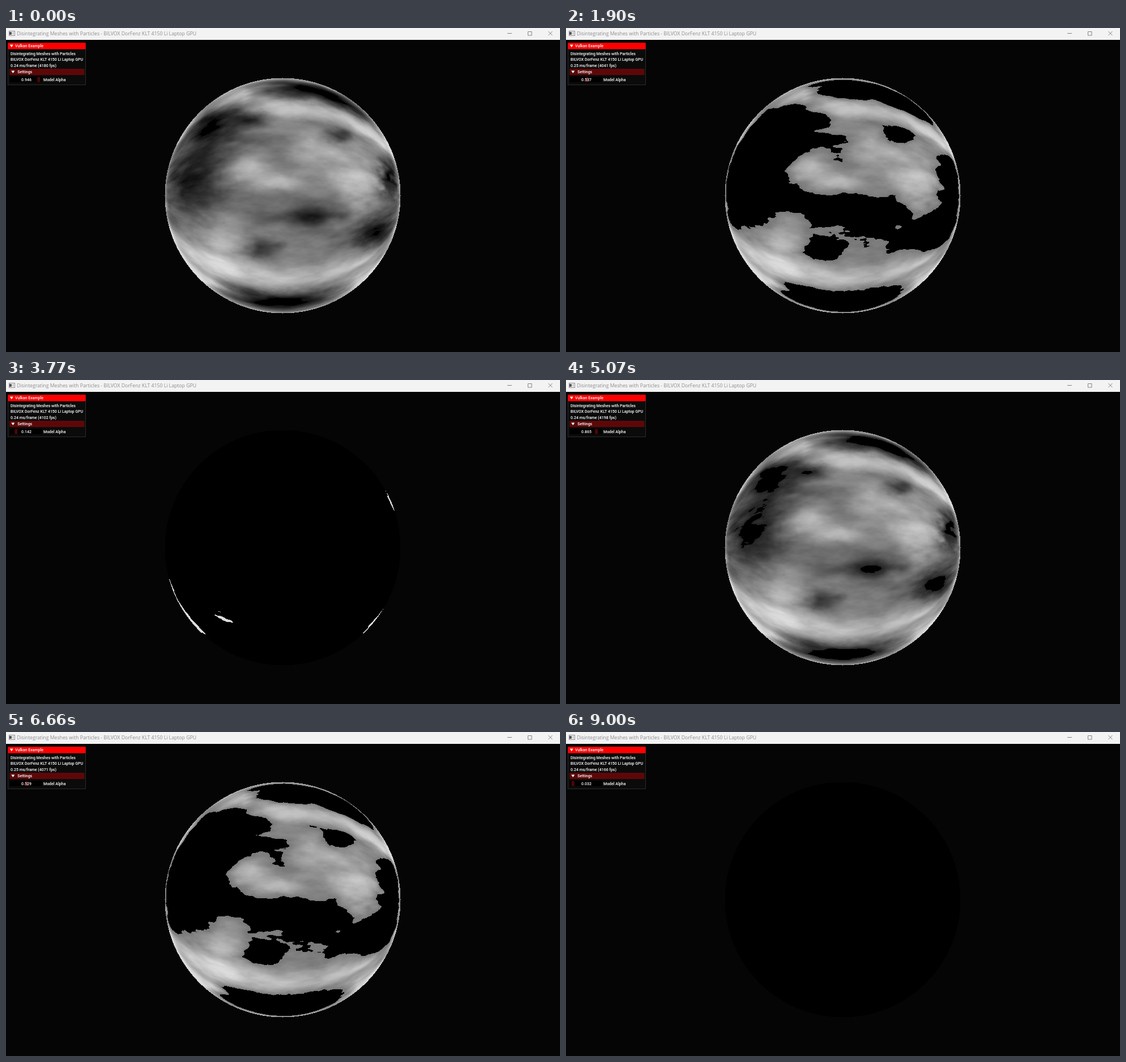
Animation, 978 px wide and 573 px high, one loop 9.07 s. Source, as an HTML page with a canvas:

```html
<!DOCTYPE html>
<html lang="en">
<head>
<meta charset="utf-8">
<title>Disintegrating Meshes with Particles</title>
<style>
  html, body { margin: 0; width: 100%; height: 100%; overflow: hidden; background: #050505; }
  canvas, svg { position: absolute; left: 0; top: 0; }
  .ui { font: 500 7px Roboto, sans-serif; fill: #fff; }
  .title { font: 8.7px "Open Sans", sans-serif; fill: #8c8c8c; }
</style>
</head>
<body>
<canvas id="stage" width="978" height="573"></canvas>
<svg width="978" height="573" viewBox="0 0 978 573">
  <rect width="978" height="21" fill="#f3f3f3"/>
  <rect x="5.5" y="5.5" width="10" height="8" fill="#fff" stroke="#8a8a8a"/>
  <rect x="6" y="7" width="4" height="5" fill="#555"/>
  <rect x="11" y="7" width="3" height="5" fill="#c8c8c8"/>
  <text class="title" x="19" y="12.8">Disintegrating Meshes with Particles - BILVOX DorFenz KLT 4150 Li Laptop GPU</text>
  <path d="M885 9.5h8M921.5 6.5h6.5v6.5h-6.5zM957.5 6l7 7m0-7l-7 7" fill="none" stroke="#777" stroke-width=".9"/>

  <rect x="3.5" y="26.5" width="137" height="74" fill="#0b0b0b" stroke="#363636" stroke-width=".8"/>
  <rect x="3.5" y="26" width="137" height="11.5" fill="#f00"/>
  <rect x="6" y="72" width="132.5" height="11.2" fill="#5d0808"/>
  <path d="M6.8 29.5h6l-3 4.7zM9.3 75.4h6l-3 4.7z" fill="#fff"/>
  <rect x="7" y="86" width="57" height="10" fill="#000"/>
  <rect id="grab" y="87" width="4.8" height="8.5" fill="#550404"/>
  <g class="ui">
    <text x="16" y="34.4">Vulkan Example</text>
    <text x="8" y="48.2">Disintegrating Meshes with Particles</text>
    <text x="8" y="58.4">BILVOX DorFenz KLT 4150 Li Laptop GPU</text>
    <text id="rate" x="8" y="68.5"></text>
    <text x="20.3" y="80.3">Settings</text>
    <text id="value" x="36" y="93.5" text-anchor="middle"></text>
    <text x="66" y="93.5">Model Alpha</text>
  </g>
</svg>
<script>
const LOOP = 9070, STEP = 68.7;
const CX = 488.5, CY = 296.5, RADIUS = 208, SIZE = 418;
const LEFT = 280, TOP = 88;
const FPS = [4180, 3973, 4041, 4102, 4102, 4198, 4071, 4119, 4143, 4166];

const hash = (x, y) => {
  const s = Math.sin(x * 127.1 + y * 311.7) * 43758.5453;
  return s - Math.floor(s);
};
const mix = (a, b, t) => a + (b - a) * t;
const ease = t => t * t * (3 - 2 * t);
const clamp = (t, low = 0, high = 1) => Math.min(high, Math.max(low, t));
const bell = (x, center, width) => Math.exp(-(((x - center) / width) ** 2));

function noise(x, y) {
  const i = Math.floor(x), j = Math.floor(y), u = ease(x - i), v = ease(y - j);
  return mix(mix(hash(i, j), hash(i + 1, j), u),
             mix(hash(i, j + 1), hash(i + 1, j + 1), u), v) * 2 - 1;
}

function fractal(x, y) {
  let sum = 0, gain = .5;
  for (let octave = 0; octave < 4; octave++, gain *= .5) {
    sum += noise(x, y) * gain;
    x = x * 2.03 + 17.3;
    y = y * 2.03 + 9.1;
  }
  return sum;
}

// Bright bands around the sphere, with dark caps that fade away sideways
function bands(x, lat) {
  const cap = (center, middle) =>
    -.5 * bell(lat, center, .18) * Math.max(-.6, 1 - 4 * (x - middle) ** 2);
  const north = .32 * bell(lat, -.86, .14) * ease(clamp((x + .4) / .3));
  const south = .29 * bell(lat, .79, .17);
  return north + south + cap(-1.15, .3) + cap(1.13, 0);
}

// The main light and dark patches
function patches(x, y) {
  const spot = (cx, cy, rx, ry) => bell(x, cx, rx) * bell(y, cy, ry);
  const light = spot(425, 248, 35, 22) + spot(475, 273, 45, 17) + spot(551, 215, 55, 28)
    + spot(620, 270, 40, 52) * 1.25 + spot(378, 375, 42, 50);
  const shade = spot(540, 330, 52, 21) + spot(453, 391, 30, 19)
    + spot(584, 191, 24, 12) + spot(432, 163, 32, 14);
  const hole = spot(360, 165, 48, 42) + spot(335, 270, 50, 58) * .9
    + spot(676, 265, 16, 36) + spot(655, 365, 38, 34);
  return light * .22 - shade * .29 - hole * .42;
}

function density(px, py) {
  const x = (px - CX) / RADIUS, y = (py - CY) / RADIUS, r = Math.hypot(x, y);
  if (r > 1) return -1;
  const lon = Math.asin(x), lat = Math.asin(y / Math.sqrt(1 - .9 * x * x));
  const warpX = fractal(lon * 7 + 40, lat * 9) * 14;
  const warpY = fractal(lon * 7, lat * 9 + 70) * 8;
  const rim = clamp((r - .965) / .035) ** 2 * .27;
  const cloud = .45 + bands(x + warpX / RADIUS, lat + warpY / RADIUS)
    + patches(px + warpX, py + warpY);
  return clamp(cloud + fractal(lon * 4 + 5, lat * 10 + 3) * .13 + rim, 0, .86);
}

const field = new Float32Array(SIZE * SIZE);
for (let i = 0; i < field.length; i++)
  field[i] = density(LEFT + i % SIZE + .5, TOP + Math.floor(i / SIZE) + .5);

const byId = id => document.getElementById(id);
const ctx = byId("stage").getContext("2d");
const sphere = ctx.createImageData(SIZE, SIZE);
const pixels = new Uint32Array(sphere.data.buffer);

function draw(time) {
  const step = Math.floor(time / STEP + .35);
  const alpha = (1.946 - .01461 * step) % 1;
  const fps = FPS[Math.floor((time + 150) / 1000)];

  for (let i = 0; i < field.length; i++) {
    const v = field[i];
    const gray = v < 0 ? 5 : v > 1 - alpha ? v * 255 | 0 : 0;
    pixels[i] = 0xff000000 | gray * 0x010101;
  }
  ctx.fillStyle = "#050505";
  ctx.fillRect(0, 0, 978, 573);
  ctx.putImageData(sphere, LEFT, TOP);

  byId("rate").textContent = `${(1000 / fps).toFixed(2)} ms/frame (${fps} fps)`;
  byId("value").textContent = alpha.toFixed(3);
  byId("grab").setAttribute("x", 8.3 + 49.7 * alpha);
}

let start;
function tick(now) {
  start ??= now;
  draw((now - start) % LOOP);
  requestAnimationFrame(tick);
}
draw(0);
requestAnimationFrame(tick);
</script>
</body>
</html>
```
